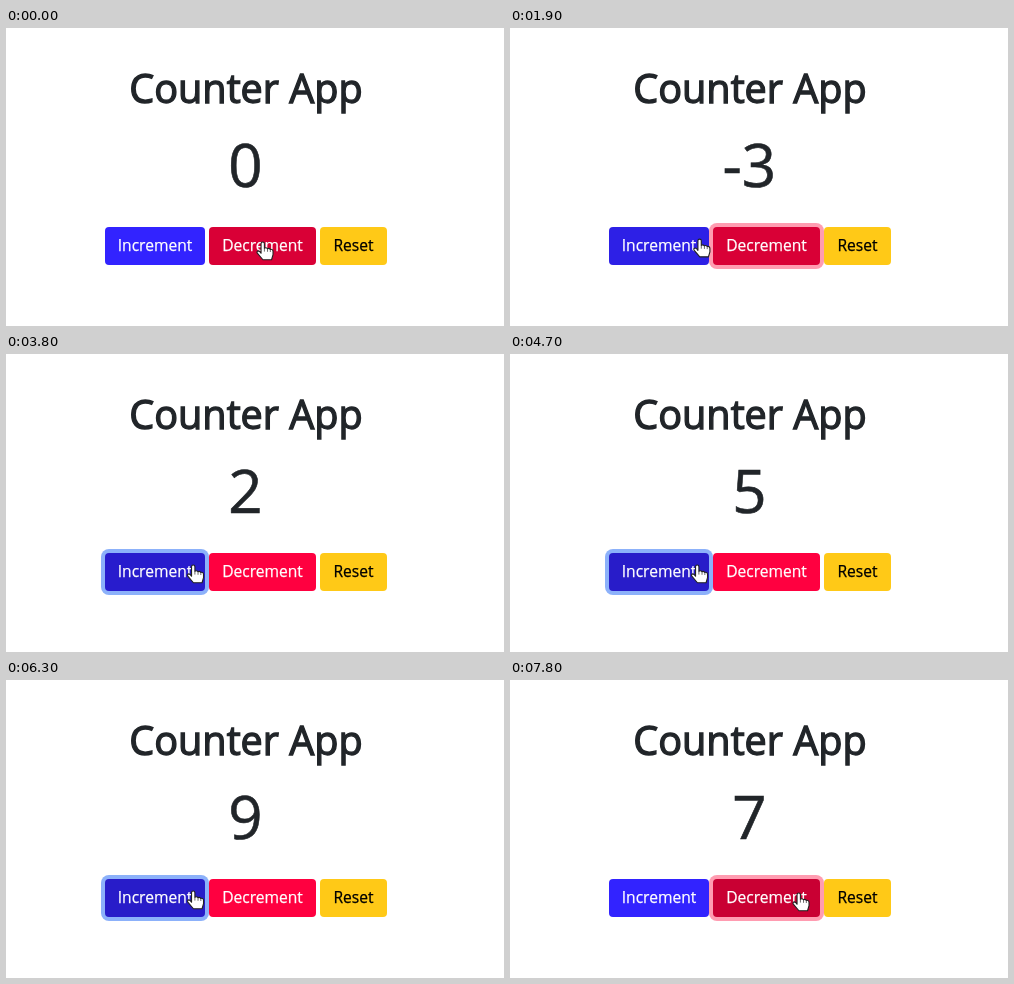
An HTML page for the animation above (8000 ms loop, 498 by 298 pixels).

```html
<!DOCTYPE html>
<html lang="en">
<head>
<meta charset="utf-8">
<title>Counter App</title>
<style>
  html, body { margin: 0; height: 100%; overflow: hidden; background: #fff; }
  svg { display: block; }
  text {
    font: 15.6px "Open Sans", "Noto Sans", sans-serif; text-anchor: middle;
    fill: currentColor; stroke: currentColor; stroke-width: .25px; color: #fff;
  }
  #title { font-size: 39.6px; stroke-width: 1.3px; color: #212529; }
  #count { font-size: 60px; stroke-width: .6px; color: #212529; }
</style>
</head>
<body>
<svg width="498" height="298" viewBox="0 0 498 298">
  <text id="title" x="240" y="75">Counter App</text>
  <text id="count" x="239.3" y="159.3">0</text>
  <g id="buttons"></g>
  <g id="hand" stroke="#222" stroke-linejoin="round">
    <path fill="#fff" d="M4.5 10.5V2a1.5 1.5 0 0 1 3 0v4q1.5-1 2.8.4 1.4-.6 2.5.6 2.2-.3 2.4 1.8v3l-1.3 4.5H6.2L1 10.2q-.5-1.6 1.2-1.8 1 .2 2.3 2.1z"/>
    <path fill="none" stroke-width=".6" d="M7.5 6v3M10.3 6.4v2.8M12.8 7v2.4"/>
  </g>
</svg>
<script>
const LOOP = 8000, STEP = 100, FADE = 150, HOLD = 220;
const HOVER = 0.15, ACTIVE = 0.21;
const byId = id => document.getElementById(id);

// Release times of the mouse button
const decFirst = [500, 850, 1400];
const incClicks = [2140, 2500, 2900, 3200, 3500, 3900, 4300, 4700, 5000, 5450, 5850, 6300];
const decLast = [7140, 7600, 7870];
const clicks = [
  ...decFirst.map(t => [t, -1]), ...incClicks.map(t => [t, 1]), ...decLast.map(t => [t, -1])
];
const incFocus = incClicks[0] - HOLD + 60, decFocus = decLast[0] - HOLD + 60;

const presses = times => times.flatMap(t => [[t - HOLD, ACTIVE], [t, HOVER]]);

function addButton(label, x, width, rgb, ringColor, shade, focus, textColor = "#fff") {
  const group = document.createElementNS("http://www.w3.org/2000/svg", "g");
  group.innerHTML = `<rect fill="${ringColor}"/>
    <rect x="${x}" y="199" width="${width}" height="38" rx="4"/>
    <text x="${x + width / 2}" y="223" style="color:${textColor}">${label}</text>`;
  byId("buttons").append(group);
  const [ring, face] = group.children;
  return { x, width, rgb, shade, focus, ring, face };
}

const buttons = [
  addButton("Increment", 99, 100, [50, 35, 255], "#8cb1fa",
    [[0, 0], [1800, HOVER], ...presses(incClicks), [decFocus, 0]],
    [[0, 0], [incFocus, 1], [decFocus, 0]]),
  addButton("Decrement", 203, 107, [255, 0, 64], "#ff9cb1",
    [[0, HOVER], ...presses(decFirst), [incFocus, 0], [6600, HOVER], ...presses(decLast)],
    [[0, 0], [280, 1], [incFocus, 0], [decFocus, 1]]),
  addButton("Reset", 314, 67, [255, 201, 23], "none", [[0, 0]], [[0, 0]], "#000")
];

// Each key starts a short linear transition from the previous value
function fade(keys, t) {
  return keys.reduce((value, [start, target]) =>
    value + (target - value) * Math.min(1, Math.max(0, (t - start) / FADE)), keys[0][1]);
}

function glide(t, start, end) {
  const p = Math.min(1, Math.max(0, (t - start) / (end - start)));
  return p * p * (3 - 2 * p);
}

function drawButton({ x, width, rgb, shade, focus, ring, face }, t) {
  const dark = 1 - fade(shade, t), amount = fade(focus, t), spread = 4 * amount;
  face.setAttribute("fill", `rgb(${rgb.map(c => Math.round(c * dark))})`);
  const box = {
    x: x - spread, y: 199 - spread, width: width + 2 * spread,
    height: 38 + 2 * spread, rx: 4 + spread, opacity: amount
  };
  for (const key in box) ring.setAttribute(key, box[key]);
}

function draw(now) {
  const t = Math.floor(now % LOOP / STEP) * STEP;
  byId("count").textContent = clicks.reduce((n, [at, d]) => t >= at ? n + d : n, 0);
  buttons.forEach(button => drawButton(button, t));
  const left = glide(t, 1500, 1950), right = glide(t, 6350, 6800);
  byId("hand").setAttribute("transform",
    `translate(${250 - 69.5 * left + 101.5 * right} ${213.5 - 3 * left + 2 * right}) scale(1.12)`);
  requestAnimationFrame(draw);
}
requestAnimationFrame(draw);
</script>
</body>
</html>
```
